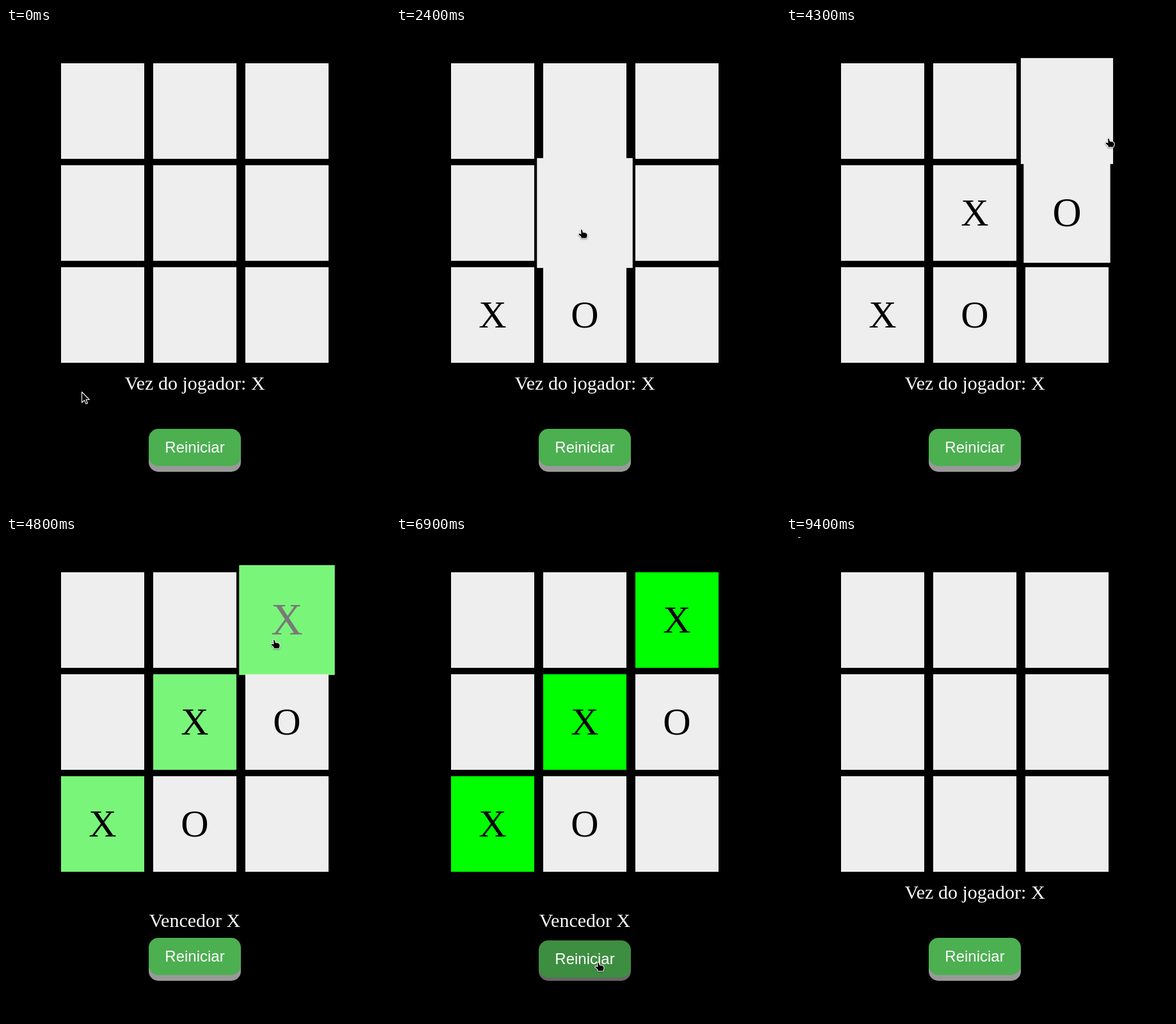
These frames come from a looping animation (600 by 750 pixels, 9600 ms). An HTML page with a canvas:

```html
<!DOCTYPE html>
<html lang="pt">
<head>
<meta charset="utf-8">
<title>Jogo da velha</title>
<style>
html, body { margin: 0; width: 100%; height: 100%; overflow: hidden; background: #000; }
canvas { display: block; }
</style>
</head>
<body>
<canvas id="stage" width="600" height="750"></canvas>
<script>
const ctx = document.getElementById('stage').getContext('2d');
const LOOP = 9600, STEP = 100, FADE = 300, SAMPLE = 5;
const SERIF = '"Liberation Serif", "Times New Roman", serif';
const SANS = '"Liberation Sans", Arial, sans-serif';
const CELL = { w: 130, h: 149, pitchX: 144, pitchY: 159, x: 151, y: 129.5, grow: 0.15 };
const BUTTON = { x: 223, y: 625, w: 144, h: 58 };
const CLICKS = [700, 1800, 2650, 3430, 4713];
const WIN = CLICKS[4], WIN_LINE = [2, 4, 6];
const PRESS = 6850, RESET = 7050;

// pointer way points: time, x, y
const path = [
  [0, 118, 567], [150, 118, 567], [500, 146, 470], [1050, 186, 466], [1500, 275, 455],
  [1950, 290, 440], [2100, 290, 357], [2550, 290, 292], [3250, 431, 300],
  [3700, 440, 290], [3800, 440, 290], [4300, 504, 172], [4650, 425, 162], [4800, 419, 160],
  [5330, 422, 168], [5500, 470, 374], [5600, 524, 607], [5700, 460, 652], [5800, 394, 633],
  [6000, 358, 622], [6250, 358, 622], [6700, 316, 663], [7950, 316, 663], [8300, 335, 755],
  [8301, -40, -40], [9000, -40, -40], [9100, -8, -11], [9200, -4, -22], [9400, 13, -18],
  [LOOP, 13, -18]
];

const clamp = v => Math.min(1, Math.max(0, v));
const lerp = (a, b, p) => a + (b - a) * p;
const gray = (p, from = 238) => Math.round(lerp(from, 0, p));

// cubic-bezier(.25, .1, .25, 1)
function ease(x) {
  if (x <= 0 || x >= 1) return clamp(x);
  const bez = (u, a, b) => 3 * u * (1 - u) ** 2 * a + 3 * u * u * (1 - u) * b + u ** 3;
  let lo = 0, hi = 1;
  for (let i = 0; i < 20; i++) {
    const mid = (lo + hi) / 2;
    if (bez(mid, 0.25, 0.25) < x) lo = mid; else hi = mid;
  }
  return bez(lo, 0.1, 1);
}

function pointerAt(t) {
  const i = path.findIndex(p => p[0] > t);
  const [t0, x0, y0] = path[i - 1], [t1, x1, y1] = path[i];
  const p = (t - t0) / (t1 - t0);
  return { x: lerp(x0, x1, p), y: lerp(y0, y1, p) };
}

const cellCenter = i => ({
  x: CELL.x + (i % 3) * CELL.pitchX,
  y: CELL.y + Math.floor(i / 3) * CELL.pitchY
});

function cellUnder({ x, y }, held) {
  if (held >= 0) {
    const c = cellCenter(held), scale = (1 + CELL.grow) / 2;
    if (Math.abs(x - c.x) < CELL.w * scale && Math.abs(y - c.y) < CELL.h * scale) return held;
  }
  const col = Math.round((x - CELL.x) / CELL.pitchX);
  const row = Math.round((y - CELL.y) / CELL.pitchY);
  return Math.min(col, row) >= 0 && Math.max(col, row) < 3 ? row * 3 + col : -1;
}

function overButton({ x, y }) {
  return x >= BUTTON.x && x < BUTTON.x + BUTTON.w && y >= BUTTON.y && y < BUTTON.y + BUTTON.h;
}

// follow the pointer once to learn when each cell is hovered
function traceHovers() {
  const spans = [];
  let held = -1;
  for (let t = 0; t < LOOP; t += SAMPLE) {
    const cell = cellUnder(pointerAt(t), held);
    if (cell !== held && cell >= 0) spans.push({ cell, from: t });
    if (cell >= 0) spans[spans.length - 1].to = t + SAMPLE;
    held = cell;
  }
  return spans;
}
const hovers = traceHovers();
const hoveredAt = t => hovers.find(h => t >= h.from && t < h.to);
const moves = CLICKS.map((at, i) => ({ at, mark: 'XO'[i % 2], cell: hoveredAt(at)?.cell }));

function hoverAmount(t, cell) {
  const span = hovers.filter(h => h.cell === cell && h.from <= t).pop();
  if (!span) return 0;
  const peak = ease((Math.min(t, span.to) - span.from) / FADE);
  // an interrupted transition runs back in proportionally less time
  return t < span.to ? peak : peak * (1 - ease((t - span.to) / (FADE * peak)));
}

function greenAmount(t, cell) {
  if (!WIN_LINE.includes(cell)) return 0;
  return t < RESET ? ease((t - WIN) / FADE) : 1 - ease((t - RESET) / FADE);
}

function text(str, x, y, font, color, align = 'center') {
  ctx.font = font;
  ctx.fillStyle = color;
  ctx.textAlign = align;
  ctx.fillText(str, x, y);
}

function drawCell(t, cell) {
  const { x, y } = cellCenter(cell);
  const scale = 1 + CELL.grow * hoverAmount(t, cell);
  const green = greenAmount(t, cell);
  const side = gray(green);
  ctx.save();
  ctx.translate(x, y);
  ctx.scale(scale, scale);
  ctx.fillStyle = `rgb(${side},${Math.round(lerp(238, 255, green))},${side})`;
  ctx.fillRect(-CELL.w / 2, -CELL.h / 2, CELL.w, CELL.h);
  const move = moves.find(m => m.cell === cell);
  if (move && t >= move.at && t < RESET) {
    const ink = gray(ease((t - move.at) / FADE));
    text(move.mark, 0, 19.5, `60px ${SERIF}`, `rgb(${ink},${ink},${ink})`);
  }
  ctx.restore();
}

function drawLabel(t) {
  const font = `30px ${SERIF}`;
  if (t >= WIN && t < RESET) {
    text('Vencedor X', 295, 608, font, '#fff');
    return;
  }
  const turns = t < RESET ? moves.filter(m => m.at <= t).length : 0;
  text('Vez do jogador: ' + 'XO'[turns % 2], 295, 564, font, '#fff');
}

function drawButton(t) {
  const pressed = t >= PRESS && t < RESET;
  const y = BUTTON.y + (pressed ? 4 : 0);
  const slab = (top, color) => {
    ctx.fillStyle = color;
    ctx.beginPath();
    ctx.roundRect(BUTTON.x, top, BUTTON.w, BUTTON.h, 15);
    ctx.fill();
  };
  slab(y + (pressed ? 5 : 9), pressed ? '#666' : '#999');
  slab(y, overButton(pointerAt(t)) ? '#3e8e41' : '#4caf50');
  text('Reiniciar', 248.3, y + 37, `24px ${SANS}`, '#fff', 'left');
}

const arrow = new Path2D('M0 0V16.5L4 13L6.5 18.5L9 17.5L6.5 12H11.8Z');
const hand = new Path2D('M-1.5 0H0L1.5 4.5L6 5L8 7V10L7 13H-1V11L-5 7.5L-4.5 6L-1 7Z');

function drawPointer(t) {
  const at = pointerAt(t);
  const isHand = hoveredAt(t) || overButton(at);
  const shape = isHand ? hand : arrow;
  ctx.save();
  ctx.translate(Math.round(at.x) + 0.5, Math.round(at.y) + 0.5);
  ctx.lineJoin = 'round';
  ctx.strokeStyle = '#fff';
  ctx.fillStyle = '#000';
  ctx.lineWidth = isHand ? 2.2 : 1.1;
  if (isHand) {
    ctx.shadowColor = 'rgba(0,0,0,.45)';
    ctx.shadowBlur = 2;
    ctx.shadowOffsetY = 1;
    ctx.stroke(shape);
    ctx.shadowColor = 'transparent';
    ctx.fill(shape);
  } else {
    ctx.fill(shape);
    ctx.stroke(shape);
  }
  ctx.restore();
}

function draw(t) {
  ctx.fillStyle = '#000';
  ctx.fillRect(0, 0, 600, 750);
  for (let cell = 0; cell < 9; cell++) drawCell(t, cell);
  drawLabel(t);
  drawButton(t);
  drawPointer(t);
}

const start = performance.now();
function tick() {
  const t = (performance.now() - start) % LOOP;
  draw(Math.floor(t / STEP) * STEP);
  requestAnimationFrame(tick);
}
tick();
</script>
</body>
</html>
```
